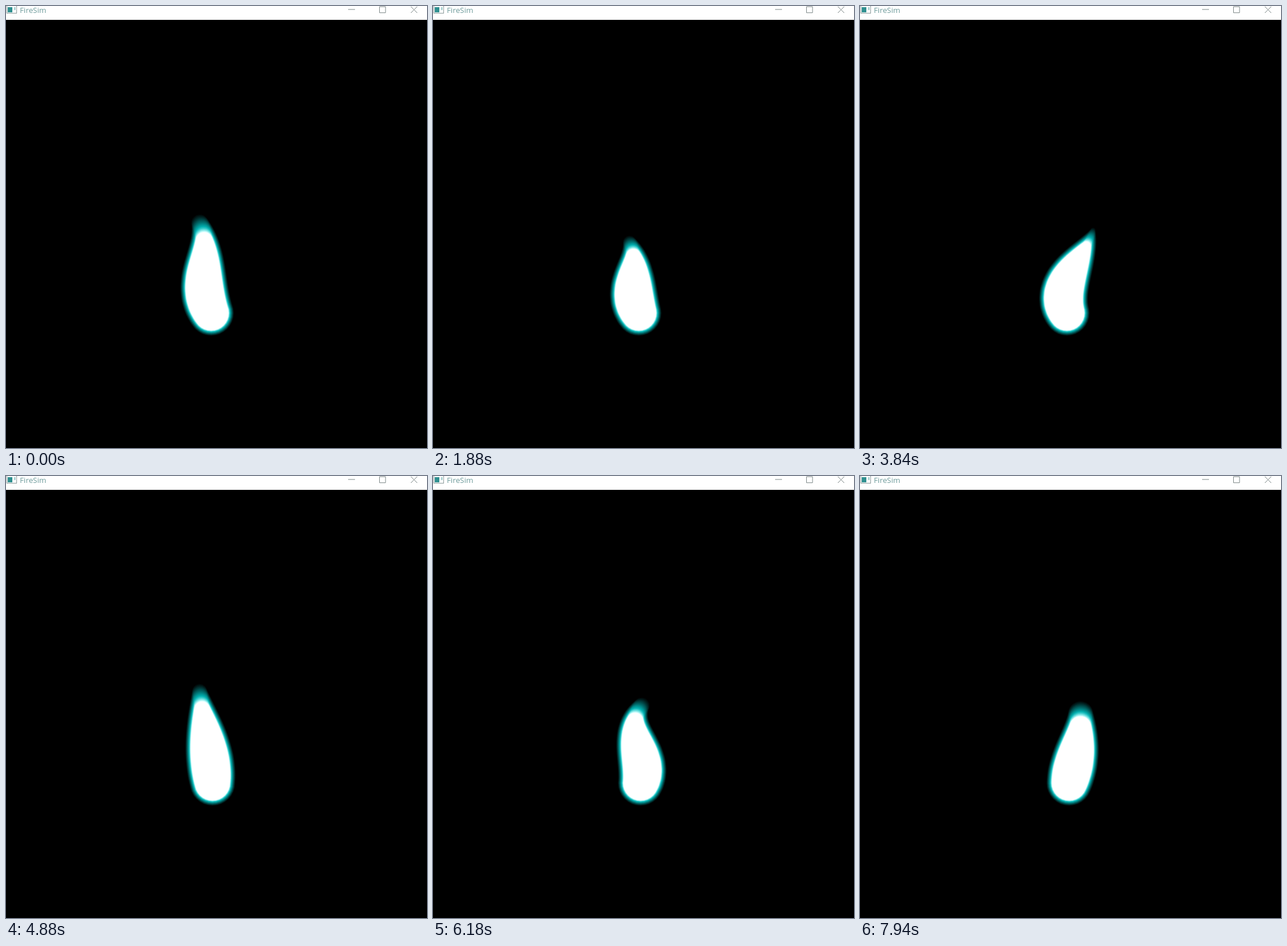
Write an HTML page with a canvas that moves like this. It is 731 px wide and 766 px high and loops after 8000 ms.

```html
<!DOCTYPE html>
<html lang="en">
<head>
<meta charset="utf-8">
<title>FireSim</title>
<style>
  html, body { margin: 0; width: 100%; height: 100%; overflow: hidden; background: #000; }
  canvas, svg { position: absolute; left: 0; top: 0; display: block; }
</style>
</head>
<body>
<canvas id="stage" width="731" height="766"></canvas>
<svg width="731" height="25" fill="none" stroke="#7b8585">
  <rect width="731" height="24" fill="#fff" stroke="none"/>
  <rect x="1.5" y="-.5" width="17" height="13" fill="#fff" stroke="#8a9a9a"/>
  <rect x="3" y="2" width="8" height="9" fill="#2f8f8f" stroke="none"/>
  <path d="M15.5 2v5" stroke="#2f8f8f"/>
  <text x="24" y="12" fill="#6f9c9c" stroke="none" font-size="13.3" font-family="'Open Sans', 'Noto Sans', sans-serif">FireSim</text>
  <path d="M594 6h12M648.5 1.2h10.5v10.5h-10.5zM703 1l11 11M714 1l-11 11"/>
</svg>
<script>
const LOOP = 8000, STEP = 93;
const BASE = { x: 359, y: 532, r: 40 }, BELLY_R = 42;
const LAYERS = 28, BEADS = 48, RIM = 10, TIP_FADE = 0.2;
const JOINTS = [0, 0.3, 0.62, 1]; // base, belly, neck and tip along the spine

// The sway of the flame at a few key steps
const POSES = [
  { step: 0, tipX: 336, tipY: 375, tipR: 15, bellyX: 344, neckX: 345 },
  { step: 14, tipX: 269, tipY: 403, tipR: 5, bellyX: 328, neckX: 304 },
  { step: 29, tipX: 429, tipY: 403, tipR: 20, bellyX: 373, neckX: 404 },
  { step: 42, tipX: 405, tipY: 387, tipR: 4, bellyX: 356, neckX: 378 },
  { step: 53, tipX: 336, tipY: 372, tipR: 13, bellyX: 353, neckX: 345 },
  { step: 67, tipX: 363, tipY: 397, tipR: 14, bellyX: 361, neckX: 351 },
  { step: 86, tipX: 383, tipY: 411, tipR: 22, bellyX: 372, neckX: 380 }
];

const ctx = document.getElementById('stage').getContext('2d');
const mix = (a, b, k) => a + (b - a) * k;
const smooth = k => k * k * (3 - 2 * k);

function poseAt(step) {
  const i = Math.max(1, POSES.findIndex(p => p.step >= step));
  const a = POSES[i - 1], b = POSES[i];
  const k = (step - a.step) / (b.step - a.step);
  const pose = {};
  for (const key in a) pose[key] = mix(a[key], b[key], smooth(k));
  // The tip leaps up between poses, less so when it swings far sideways
  pose.tipY -= (26 - 0.2 * Math.abs(b.tipX - a.tipX)) * Math.sin(Math.PI * k);
  return pose;
}

// Smooth (Lagrange) curve through one value per joint
const through = (values, u) => values.reduce((sum, value, i) =>
  sum + JOINTS.reduce((w, joint, j) => j === i ? w : w * (u - joint) / (JOINTS[i] - joint), value), 0);

function heat(k) {
  const red = 255 * Math.max(0, (k - 0.66) / 0.34) ** 1.4;
  const cyan = 255 * Math.min(1, k ** 1.1 * 1.05);
  return `rgb(${red}, ${cyan}, ${cyan})`;
}

function draw(now) {
  const pose = poseAt(Math.floor((now % LOOP + 80) / STEP));
  const baseX = BASE.x + 0.25 * (pose.bellyX - 355);
  const xs = [baseX, pose.bellyX, pose.neckX, pose.tipX];
  const radii = [BASE.r, BELLY_R, 28 + 0.3 * pose.tipR, pose.tipR];

  ctx.fillStyle = '#000';
  ctx.fillRect(0, 0, 731, 766);
  // Beads along the spine merge into one shape; hotter layers are thinner and shorter
  for (let layer = 1; layer <= LAYERS; layer++) {
    const k = layer / LAYERS;
    ctx.beginPath();
    for (let i = 0; i <= BEADS; i++) {
      const u = i / BEADS * (1 - TIP_FADE * k);
      const x = through(xs, u), y = mix(BASE.y, pose.tipY, u);
      const r = Math.max(0.5, through(radii, u) - RIM * k);
      ctx.moveTo(x + r, y);
      ctx.arc(x, y, r, 0, 2 * Math.PI);
    }
    ctx.fillStyle = heat(k);
    ctx.fill();
  }
}

let start;
function frame(now) {
  start ??= now;
  draw(now - start);
  requestAnimationFrame(frame);
}
draw(0);
requestAnimationFrame(frame);
</script>
</body>
</html>
```
